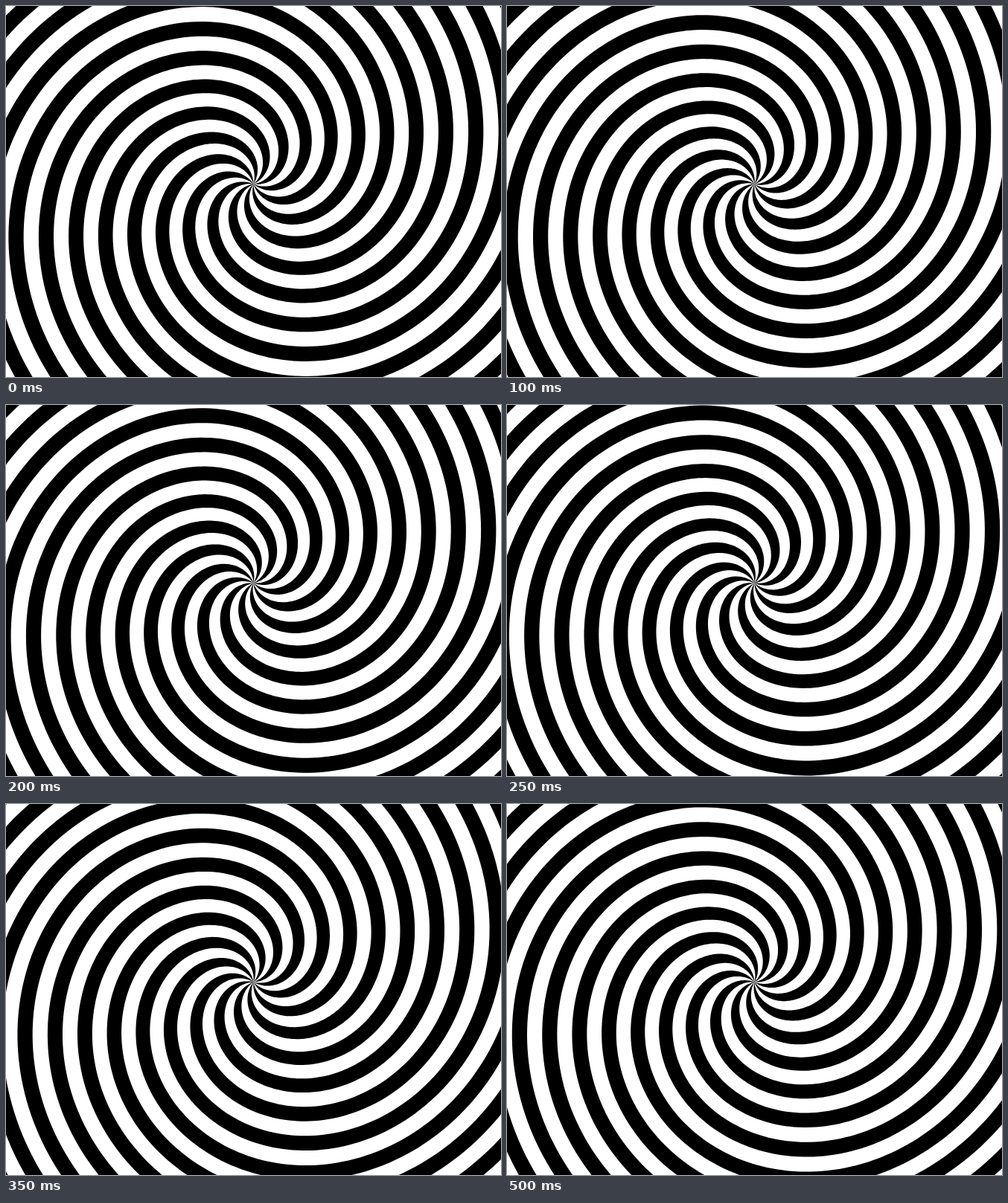
Write an HTML page with a canvas that moves like this. It is 665 px wide and 499 px high and loops after 0.55 s.

```html
<!DOCTYPE html>
<html lang="en">
<head>
<meta charset="utf-8">
<title>Spiral</title>
<style>
  html, body { margin: 0; width: 100%; height: 100%; overflow: hidden; background: #fff; }
  canvas { display: block; }
</style>
</head>
<body>
<canvas id="stage" width="665" height="499"></canvas>
<script>
const ctx = document.getElementById('stage').getContext('2d');
const CENTER = { x: 332.5, y: 239.5 };
const ARMS = 11;
const PITCH = 2 * Math.PI / ARMS;
const GROWTH = 72.8;        // radius gained per radian
const MAX_RADIUS = 432;
const START_ANGLE = -0.129;
const STEP_MS = 50;

// Share of one arm pitch turned at each step; slightly faster at first.
const TURN = [0, 0.12, 0.22, 0.32, 0.42, 0.513, 0.605, 0.703, 0.775, 0.846, 0.917];

function edgePoint(path, radius, angle) {
  const a = angle + radius / GROWTH;
  path.lineTo(radius * Math.cos(a), -radius * Math.sin(a));
}

function buildSpiral() {
  const path = new Path2D();
  for (let arm = 0; arm < ARMS; arm++) {
    const angle = START_ANGLE + arm * PITCH;
    path.moveTo(0, 0);
    for (let r = 2; r <= MAX_RADIUS; r += 2) edgePoint(path, r, angle);
    for (let r = MAX_RADIUS; r > 0; r -= 2) edgePoint(path, r, angle + PITCH / 2);
    path.closePath();
  }
  return path;
}

const spiral = buildSpiral();

function draw(time) {
  const step = Math.floor(time / STEP_MS) % TURN.length;
  ctx.setTransform(1, 0, 0, 1, 0, 0);
  ctx.fillStyle = '#fff';
  ctx.fillRect(0, 0, 665, 499);
  ctx.translate(CENTER.x, CENTER.y);
  ctx.rotate(TURN[step] * PITCH);
  ctx.fillStyle = '#000';
  ctx.fill(spiral);
}

let start = null;
function tick(now) {
  if (start === null) start = now;
  draw(now - start);
  requestAnimationFrame(tick);
}
draw(0);
requestAnimationFrame(tick);
</script>
</body>
</html>
```
